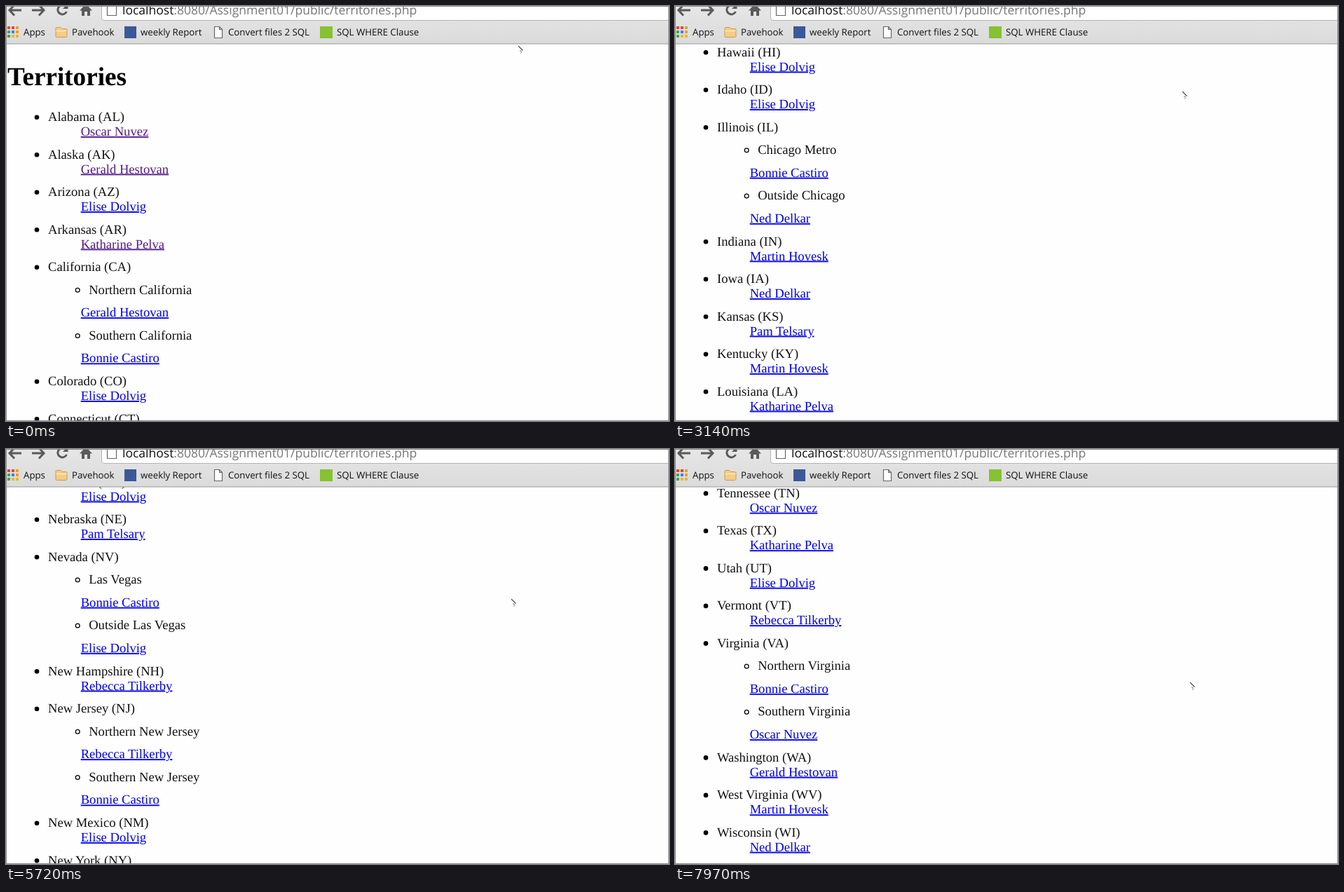
An HTML page that plays this animation: 946x592 px, repeating every 8 s.

```html
<!DOCTYPE html>
<html lang="en">
<head>
<meta charset="utf-8">
<title>Territories</title>
<style>
  html, body { margin: 0; width: 100%; height: 100%; overflow: hidden; background: #fefefe; }
  svg { display: block; text-rendering: geometricPrecision; }
  #page { font: 18.6px "Liberation Serif", serif; fill: #111; }
  #page .title { font-size: 37.2px; font-weight: bold; fill: #000; }
  #page .link { fill: #00e; text-decoration: underline; text-decoration-skip-ink: none; }
  #page .visited { fill: #551a8b; }
  .bullet { fill: #000; }
  .ring { fill: none; stroke: #000; stroke-width: 1.3; }
  .bar { font: 13.25px "Open Sans", "Noto Sans", sans-serif; fill: #111; }
  .address { font-size: 17.5px; fill: #777; }
  .icon { fill: none; stroke: #5a5a5a; stroke-width: 3; }
  .sheet { fill: #fff; stroke: #666; stroke-width: 1.2; }
</style>
</head>
<body>
<svg width="946" height="592" viewBox="0 0 946 592">
  <defs>
    <linearGradient id="chrome" x2="0" y2="1">
      <stop offset="0" stop-color="#e6e6e6"/>
      <stop offset="1" stop-color="#dbdbdb"/>
    </linearGradient>
  </defs>
  <rect width="946" height="592" fill="#fefefe"/>
  <g id="page"><text class="title" x="2" y="113">Territories</text></g>

  <g class="bar">
    <rect width="946" height="54" fill="url(#chrome)"/>
    <rect y="53.5" width="946" height="1" fill="#999"/>
    <path d="M136.5 -2V17Q136.5 20.5 140 20.5H950V-2Z" fill="#fff" stroke="#b4b4b4"/>
    <path class="icon" d="M22 6H5M12 -1.5L5 6L12 13.5M37 6H54M47 -1.5L54 6L47 13.5"/>
    <path class="icon" stroke-width="2.6" d="M85.5 1A6.6 6.6 0 1 0 86.5 8"/>
    <path d="M81 4H88.5V-3.5Z" fill="#5a5a5a"/>
    <path d="M105 6.5L114 -3L123 6.5H120V14H116V8H112V14H108V6.5Z" fill="#5a5a5a"/>
    <path class="sheet" stroke="#999" d="M144.5 -3H157.5V13.5H144.5Z"/>
    <text class="address" x="166" y="11.5"><tspan fill="#111">localhost</tspan>:8080/Assignment01/public/territories.php</text>

    <g id="apps"></g>
    <path d="M71 32Q71 30.5 72.5 30.5H78L80 32.5H85.5Q87 32.5 87 34V43Q87 44.5 85.5 44.5H72.5Q71 44.5 71 43Z" fill="#f3cd85" stroke="#c99a4c"/>
    <path d="M71.5 35.5H86.5" stroke="#fbe6bb" stroke-width="1.5"/>
    <rect x="169" y="29" width="17" height="17" fill="#3b5998"/>
    <path class="sheet" d="M297.5 29.5H304.5L308.5 33.5V45.5H297.5ZM304.5 29.5V33.5H308.5"/>
    <rect x="448" y="29" width="18" height="17" fill="#86c232"/>
    <text x="25" y="42">Apps</text>
    <text x="94" y="42">Pavehook</text>
    <text x="192" y="42">weekly Report</text>
    <text x="317" y="42">Convert files 2 SQL</text>
    <text x="472" y="42">SQL WHERE Clause</text>
  </g>

  <g id="cursor" fill="none" stroke-width="1.1">
    <path d="M1 1L7.5 7.5" stroke="#444"/>
    <path d="M3 8.5L4.5 7.5L6 10.5M4 10.5L5 11.5" stroke="#999"/>
  </g>
  <rect x=".5" y=".5" width="945" height="591" fill="none" stroke="#888"/>
</svg>
<script>
const LOOP = 8000, ITEM_PITCH = 53.5, SUB_PITCH = 32.6, LINK_DROP = 21;

const people = {
  D: 'Oscar Nuvez', R: 'Gerald Hestovan', I: 'Elise Dolvig', E: 'Katharine Pelva',
  S: 'Bonnie Castiro', B: 'Rebecca Tilkerby', K: 'Ned Delkar', H: 'Martin Hovesk', M: 'Pam Telsary'
};

// State:initials, or State/Region:initials/Region:initials; lower case marks a visited link.
const territories = `Alabama (AL):d
Alaska (AK):r
Arizona (AZ):I
Arkansas (AR):e
California (CA)/Northern California:R/Southern California:S
Colorado (CO):I
Connecticut (CT):B
Delaware (DE):B
Florida (FL):D
Georgia (GA):D
Hawaii (HI):I
Idaho (ID):I
Illinois (IL)/Chicago Metro:S/Outside Chicago:K
Indiana (IN):H
Iowa (IA):K
Kansas (KS):M
Kentucky (KY):H
Louisiana (LA):E
Maine (ME):B
Maryland (MD):B
Massachusetts (MA):B
Michigan (MI):H
Minnesota (MN):K
Mississippi (MS):E
Missouri (MO)/Eastern Missouri:H/Western Missouri:M
Montana (MT):I
Nebraska (NE):M
Nevada (NV)/Las Vegas:S/Outside Las Vegas:I
New Hampshire (NH):B
New Jersey (NJ)/Northern New Jersey:B/Southern New Jersey:S
New Mexico (NM):I
New York (NY)/New York City:BS/Outside New York City:B
North Carolina (NC):D
North Dakota (ND):M
Ohio (OH):H
Oklahoma (OK):E
Oregon (OR):R
Pennsylvania (PA)/Eastern Pennsylvania:S/Western Pennsylvania:H
Rhode Island (RI):B
South Carolina (SC):D
South Dakota (SD):M
Tennessee (TN):D
Texas (TX):E
Utah (UT):I
Vermont (VT):B
Virginia (VA)/Northern Virginia:S/Southern Virginia:D
Washington (WA):R
West Virginia (WV):H
Wisconsin (WI):K`.split('\n');

// Time, scroll offset, cursor x; each pose holds until the next.
const poses = [
  [0, 0, 730], [1300, 34, 730], [1420, 79, 730], [1570, 126.7, 729], [1720, 192, 728],
  [2000, 249, 728], [2120, 332, 727], [2270, 430, 726], [2400, 521, 724], [2860, 566, 723],
  [3010, 650, 723], [3140, 737, 723], [3280, 834, 721], [3680, 915, 719], [3800, 996, 717],
  [3930, 1085, 717], [4070, 1180, 717], [4750, 1266, 717], [4910, 1352, 717], [5050, 1440, 718],
  [5170, 1535, 718], [5450, 1590, 718], [5570, 1690, 718], [5720, 1777.5, 720], [5840, 1890, 724],
  [6000, 1990, 727], [6430, 2100, 728], [6560, 2211.7, 729], [6700, 2380, 731], [6820, 2548, 733],
  [7230, 2717, 734], [7360, 2886, 735], [7500, 3055.3, 735], [7970, 3055.3, 734]
];

const page = document.getElementById('page');
const cursor = document.getElementById('cursor');

function add(parent, tag, attributes, text = '') {
  const node = document.createElementNS(page.namespaceURI, tag);
  for (const name in attributes) node.setAttribute(name, attributes[name]);
  node.textContent = text;
  parent.append(node);
}

function addLabel(text, x, y, kind) {
  add(page, 'circle', { class: kind, cx: x - 16, cy: y + .7, r: kind === 'ring' ? 2.9 : 3.3 });
  add(page, 'text', { x, y: y + 6 }, text);
}

function addLink(initials, y) {
  const upper = initials.toUpperCase();
  const style = initials === upper ? 'link' : 'link visited';
  add(page, 'text', { class: style, x: 106.7, y: y + 6 }, [...upper].map(key => people[key]).join(''));
}

function buildPage() {
  let y = 158;
  for (const line of territories) {
    const [head, ...regions] = line.split('/');
    const [state, owner] = head.split(':');
    addLabel(state, 60, y, 'bullet');
    if (owner) {
      addLink(owner, y + LINK_DROP);
      y += ITEM_PITCH;
      continue;
    }
    for (const region of regions) {
      const [name, initials] = region.split(':');
      addLabel(name, 118.2, y += SUB_PITCH, 'ring');
      addLink(initials, y += SUB_PITCH);
    }
    y += SUB_PITCH;
  }
}

function buildAppsIcon() {
  const colors = ['#e5443a', '#e5443a', '#f0a020', '#3fa652', '#4080e0', '#f0a020', '#3fa652', '#f0b428', '#f0b428'];
  colors.forEach((fill, i) => add(document.getElementById('apps'), 'rect',
    { x: 2 + i % 3 * 6, y: 29 + Math.floor(i / 3) * 6, width: 4, height: 4, fill }));
}

function render(now) {
  const time = now % LOOP;
  const [start, scroll, x] = poses.findLast(pose => pose[0] <= time);
  const y = start === 7970 ? 332 : 55.5 + scroll / 11.3;
  page.setAttribute('transform', `translate(0 ${-scroll})`);
  cursor.setAttribute('transform', `translate(${x} ${Math.round(y)})`);
  requestAnimationFrame(render);
}

buildPage();
buildAppsIcon();
render(0);
</script>
</body>
</html>
```
